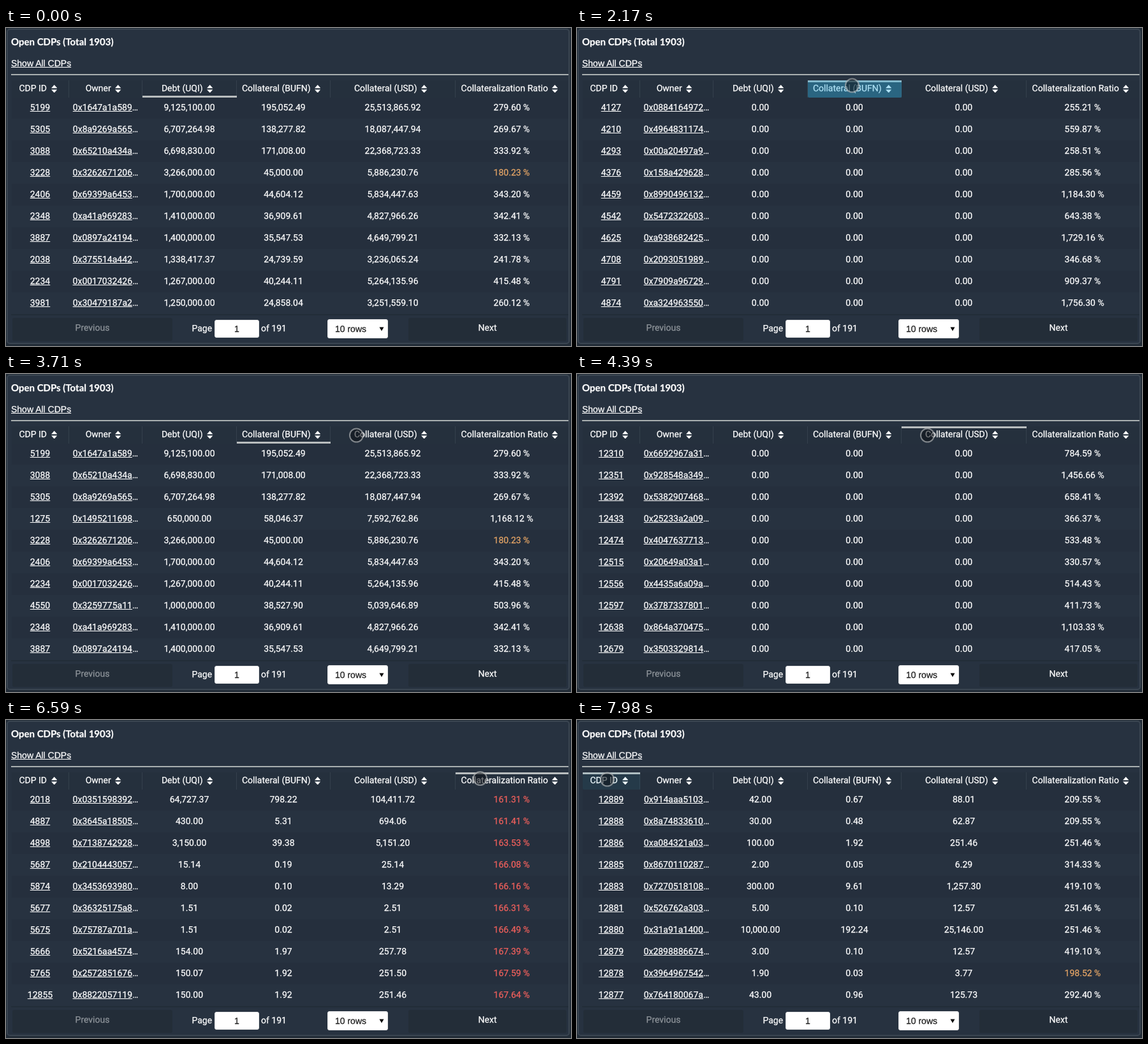
Animation, 886 px wide and 498 px high, one loop 8 s. Source, as an HTML page:

```html
<!DOCTYPE html>
<html lang="en">
<head>
<meta charset="utf-8">
<title>Open CDPs</title>
<style>
  html, body { margin: 0; width: 100%; height: 100%; overflow: hidden; background: #222c37; }
  body {
    position: relative; color: #fff; font: 14px/20px Roboto, sans-serif; white-space: pre;
    text-rendering: geometricPrecision; -webkit-text-stroke: .25px;
  }
  body > * { position: absolute; box-sizing: border-box; }
  .panel { left: 1px; top: 1px; width: 883px; height: 494px; border: 2px solid #3a4551; border-radius: 5px; background: #273240; }
  .title { left: 8px; top: 12px; font: bold 15px/20px Lato, sans-serif; }
  .arial { font-family: "Liberation Sans", Arial, sans-serif; }
  .all { left: 8px; top: 45px; text-decoration: underline; }
  .rule { left: 8px; width: 874px; height: 2px; }
  .row { display: grid; grid-template-columns: 90px 115px 148px 147px 196px 177px; text-align: center; }
  #head { left: 9px; top: 82px; height: 27px; background: #25303d; }
  #head div { position: relative; display: flex; justify-content: center; padding: 3px 6.6px 0 0; border-right: 1px solid #34404c; }
  #head div:last-child { border-color: transparent; }
  #head svg { width: 9.4px; height: 12.6px; margin: 3.8px 0 0 6.5px; fill: #fff; }
  #head div::before, #head div::after { content: ""; position: absolute; left: 0; right: -1px; }
  #head .down::before, #head .up::before { height: 3px; background: #b9bdbe; }
  #head .down::before { bottom: 0; }
  #head .up::before { top: 0; }
  #head div::after { top: 0; bottom: 0; border-radius: 2px; background: rgb(51,181,229); opacity: calc(.4 * var(--glow, 0)); }
  .view { left: 9px; top: 108px; }
  .view .row { height: 34px; padding-top: 7px; box-sizing: border-box; }
  .view .row:nth-child(odd) { background: rgba(0,0,0,.05); }
  .view span { padding-right: 1px; }
  .warn { color: #e5a566; }
  .bad { color: #f0605c; }
  .button { top: 454px; height: 36px; padding-top: 6px; border-radius: 3px; text-align: center; background: #232d38; }
  .field { border: 1px solid #e4e5e6; border-radius: 3px; background: #fff; color: #1c1c1c; }
  .field svg { position: absolute; left: 80px; top: 11px; }
  #cursor { left: -11.5px; top: -11.5px; width: 23px; height: 23px; border: 2px solid rgba(165,168,170,.72); border-radius: 50%; background: rgba(14,17,22,.55); background-clip: padding-box; }
</style>
</head>
<body>
<div class="panel"></div>
<div class="title">Open CDPs (Total 1903)</div>
<div class="arial all">Show All CDPs</div>
<div class="rule" style="top:72px;background:#a9afb0"></div>
<div id="head" class="row"></div>
<div class="rule" style="top:448px;background:#222d38"></div>
<div class="button" style="left:10px;width:251px;color:#8f959b">Previous</div>
<div style="left:291.5px;top:461px">Page</div>
<div class="field arial" style="left:327px;top:457px;width:70px;height:28px;padding-top:3px;text-align:center">1</div>
<div style="left:400px;top:461px">of 191</div>
<div class="field arial" style="left:504px;top:456px;width:95px;height:30px;padding:4px 11px">10 rows<svg width="8" height="8"><path d="M.5.5h7l-3.5 6z"/></svg></div>
<div class="button" style="left:631px;width:248px">Next</div>
<div id="cursor"></div>
<script>
const LOOP = 8000;
const PRICE = 130.805128;
const OWNER_WIDTH = 104.5;
const titles = ['CDP ID', 'Owner', 'Debt (UQI)', 'Collateral (BUFN)', 'Collateral (USD)', 'Collateralization Ratio'];

function random(seed) {
  let s = seed * 2654435761 >>> 0;
  return () => {
    s = Math.imul(s ^ s >>> 15, 0x2c1b3c6d) + 0x9e3779b9 >>> 0;
    return (s ^ s >>> 13) / 2 ** 32 % 1 + (s >>> 13 > s ? 1 : 0) * 0;
  };
}

// Made-up address, cut to the column width
const ruler = document.createElement('canvas').getContext('2d');
ruler.font = '14px Roboto, sans-serif';
function owner(id) {
  const next = random(id);
  let text = '0x';
  for (let i = 0; i < 10; i++) text += '0123456789abcdefABCDEF'[Math.abs(next()) * 22 | 0];
  while (ruler.measureText(text + '…').width > OWNER_WIDTH) text = text.slice(0, -1);
  return text;
}

const position = (id, debt, ratio) => {
  const usd = debt * ratio / 100;
  return {id, debt, ratio, usd, collateral: usd / PRICE};
};
const parse = (text, make) => text.split(',').map(item => make(...item.trim().split(' ').map(Number)));
const top10 = (list, key) => [...list].sort((a, b) => b[key] - a[key]).slice(0, 10);

// id, debt, collateral
const large = parse(`5199 9125100 195052.49, 5305 6707264.98 138277.82, 3088 6698830 171008,
  3228 3266000 45000, 2406 1700000 44604.12, 2348 1410000 36909.61, 3887 1400000 35547.53,
  2038 1338417.37 24739.59, 2234 1267000 40244.11, 3981 1250000 24858.04,
  4550 1000000 38527.9, 1275 650000 58046.37`,
  (id, debt, amount) => position(id, debt, amount * PRICE / debt * 100));
// id, debt, ratio
const risky = parse(`2018 64727.37 161.31, 4887 430 161.41, 4898 3150 163.53, 5687 15.14 166.08,
  5874 8 166.16, 5677 1.51 166.31, 5675 1.51 166.49, 5666 154 167.39, 5765 150.07 167.59,
  12855 150 167.64`, position);
const newest = parse(`12889 42 209.55, 12888 30 209.55, 12886 100 251.46, 12885 2 314.33,
  12883 300 419.1, 12881 5 251.46, 12880 10000 251.46, 12879 3 419.1, 12878 1.9 198.52,
  12877 43 292.4`, position);
// Near-empty positions lead the ascending collateral views
const dust = (firstId, step) => Array.from({length: 10}, (_, i) => {
  const id = firstId + i * step;
  return position(id, 1e-5, 10 ** (2.35 + 1.8 * Math.abs(random(id)())));
});

const byCollateral = top10(large, 'collateral');
const views = [top10(large, 'debt'), dust(4127, 83), byCollateral, dust(12310, 41), byCollateral, risky, newest];

const money = n => n.toLocaleString('en-US', {minimumFractionDigits: 2, maximumFractionDigits: 2});
const tone = ratio => ratio < 170 ? 'bad' : ratio < 200 ? 'warn' : '';
const rowMarkup = p => `<div class="row"><span><u>${p.id}</u></span><span><u>${owner(p.id)}</u>…</span>` +
  [p.debt, p.collateral, p.usd].map(n => `<span>${money(n)}</span>`).join('') +
  `<span class="${tone(p.ratio)}">${money(p.ratio)} %</span></div>`;

const head = document.getElementById('head');
const cursor = document.getElementById('cursor');
head.innerHTML = titles.map(title =>
  `<div>${title}<svg viewBox="0 0 9.4 12.6"><path d="M0 5.2h9.4L4.7 0zm0 2.2h9.4l-4.7 5.2z"/></svg></div>`).join('');
head.insertAdjacentHTML('beforebegin',
  views.map(list => `<div class="view">${list.map(rowMarkup).join('')}</div>`).join(''));
const cells = [...head.children];
const tables = [...document.querySelectorAll('.view')];

const SORT_DELAY = 70, FADE = 100;
const taps = [
  {at: 2050, col: 3, dir: 'up'}, {at: 2810, col: 3, dir: 'down'},
  {at: 4080, col: 4, dir: 'up'}, {at: 4760, col: 4, dir: 'down'},
  {at: 6210, col: 5, dir: 'up'}, {at: 7860, col: 0, dir: 'up', hold: 40}
];

// Cursor moves: start, end, x, y, ease-out power
const entry = [784, 490];
const moves = [
  [660, 1420, 447, 109.5, 2], [1490, 1680, 431, 89.5, 1], [3140, 3640, 549, 95.5, 1],
  [5170, 5710, 757, 91, 1], [5710, 5840, 743, 91, 1], [6600, 7790, 47, 92.5, 1]
];

function cursorAt(t) {
  let [x, y] = entry;
  for (const [from, to, toX, toY, power] of moves) {
    const k = Math.min(1, Math.max(0, (t - from) / (to - from)));
    const eased = 1 - (1 - k) ** power;
    x += (toX - x) * eased;
    y += (toY - y) * eased;
  }
  return [x, y];
}

function draw(t) {
  const sorted = taps.filter(tap => t >= tap.at + SORT_DELAY);
  tables.forEach((table, i) => table.style.display = i === sorted.length ? '' : 'none');
  const {col, dir} = sorted.pop() || {col: 2, dir: 'down'};
  const tap = taps.filter(p => t >= p.at).pop();
  cells.forEach((cell, i) => {
    const tapped = tap && tap.col === i;
    const glow = tapped ? 1 - (t - tap.at - (tap.hold || 200)) / FADE : 0;
    cell.className = i === col ? dir : '';
    cell.style.setProperty('--glow', Math.min(1, Math.max(0, glow)));
  });
  const [x, y] = cursorAt(t);
  cursor.style.visibility = t < moves[0][0] ? 'hidden' : '';
  cursor.style.transform = `translate(${x}px, ${y}px)`;
}

const start = performance.now();
function tick() {
  draw((performance.now() - start) % LOOP);
  requestAnimationFrame(tick);
}
tick();
</script>
</body>
</html>
```
